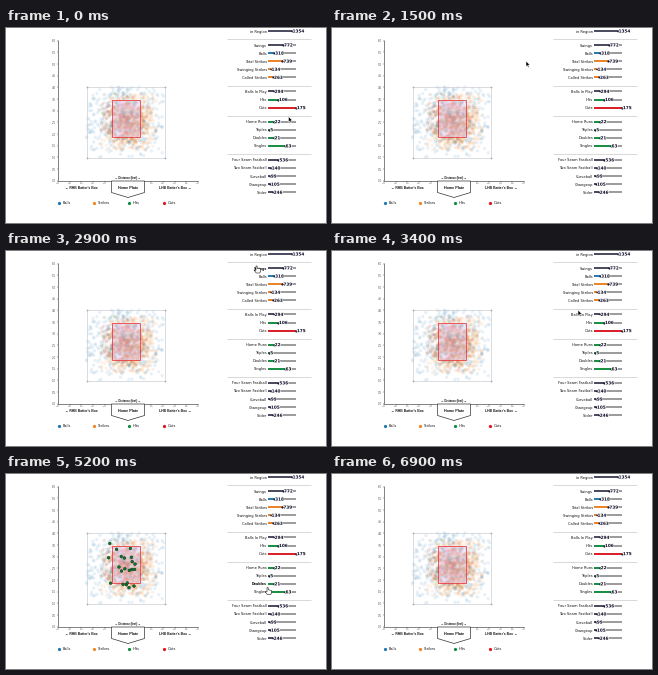
A matplotlib script for the animation above (7000 ms loop, 320 by 195 pixels).

```python
import numpy as np
import matplotlib.pyplot as plt
from matplotlib.animation import FuncAnimation
from matplotlib.colors import to_rgb
from matplotlib.patches import Polygon, Rectangle
from matplotlib.patheffects import withStroke

W, H, DPI = 320, 195, 100
FRAMES, INTERVAL = 70, 100
PT = 72 / DPI
INK, SLATE, TRACK = "#333333", "#45455c", "#929292"
BLUE, ORANGE, GREEN, RED = "#1f77b4", "#f58220", "#0b8f3a", "#e3141c"
SANS = "Liberation Sans"

fig = plt.figure(figsize=(W / DPI, H / DPI), dpi=DPI, facecolor="white")
ax = fig.add_axes([0, 0, 1, 1])
ax.set_xlim(0, W)
ax.set_ylim(H, 0)
ax.axis("off")


def line(xs, ys, color=INK, width=0.6, z=2):
    ax.plot(xs, ys, color=color, lw=width * PT, zorder=z,
            solid_capstyle="butt")


def dots(xs, ys, size, color, z=4, **kw):
    return ax.scatter(xs, ys, s=(size * PT) ** 2, c=color, linewidths=0,
                      zorder=z, **kw)


def label(x, y, s, size, ha="center", weight="normal", color="#111111",
          font="DejaVu Sans", z=6):
    return ax.text(x, y, s, fontsize=size * PT, ha=ha, va="center_baseline",
                   weight=weight, color=color, family=font, zorder=z)


# Pitch locations, in stage pixels
rng = np.random.default_rng(11)
LEFT, RIGHT, TOP, BOTTOM = 80.5, 158.5, 59, 129.5
ZONE = Rectangle((105.5, 71.5), 28.5, 37.5, fc=(0.84, 0.74, 0.95, 0.4),
                 ec="#e8383c", lw=0.8 * PT, zorder=3)
INPLAY_SPREAD = (10, 12)
STRIKE_SPREAD = (15, 15)


def cloud(n, center, spread, reach=1.9, hollow=0.0):
    """Normal scatter cut at `reach` sigmas, thinned out inside the zone."""
    pts = []
    while len(pts) < n:
        step = rng.normal(0, 1, 2)
        x, y = p = center + step * spread
        in_zone = abs(x - 120) < 14 and abs(y - 90) < 19
        if (np.abs(step).max() < reach and LEFT < x < RIGHT
                and TOP < y < BOTTOM
                and not (in_zone and rng.random() < hollow)):
            pts.append(p)
    return np.array(pts)


HITS = ["Home Runs", "Triples", "Doubles", "Singles"]
STRIKES = ["Called Strikes", "Swinging Strikes", "Fouls"]
PITCHES = ["Four Seam Fastball", "Two Seam Fastball", "Curveball",
           "Changeup", "Slider"]
PARTS = {
    "Total Strikes": STRIKES,
    "Balls In Play": HITS + ["Outs"],
    "Hits": HITS,
    "Swings": HITS + ["Outs"] + STRIKES[1:],
}

# Stat rows by section: name, count, count of a full bar, color
SECTIONS = [
    [("in Region", 1354, 1600, SLATE)],
    [("Swings", 772, 1430, SLATE), ("Balls", 318, 1430, BLUE),
     ("Total Strikes", 739, 1430, ORANGE),
     ("Swinging Strikes", 134, 1430, ORANGE),
     ("Called Strikes", 263, 1430, ORANGE)],
    [("Balls In Play", 294, 1430, SLATE), ("Hits", 106, 294, GREEN),
     ("Outs", 175, 175, RED)],
    [("Home Runs", 22, 106, GREEN), ("Triples", 5, 106, GREEN),
     ("Doubles", 21, 106, GREEN), ("Singles", 63, 106, GREEN)],
    [(name, n, 1430, SLATE)
     for name, n in zip(PITCHES, (536, 140, 99, 105, 246))],
]
counts = {row[0]: row[1] for section in SECTIONS for row in section}
counts["Fouls"] = (counts["Total Strikes"] - counts["Called Strikes"]
                   - counts["Swinging Strikes"])

points, kinds, hues = [], [], []
for kind in ["Balls", "Outs"] + STRIKES + HITS:
    n = counts[kind]
    if kind == "Balls":
        pts, hue = cloud(n, (117, 91), (25, 22), hollow=0.75), BLUE
    elif kind in STRIKES:
        pts, hue = cloud(n, (123, 94), STRIKE_SPREAD), ORANGE
    else:
        pts = cloud(n, (119, 91), INPLAY_SPREAD, reach=2.4)
        hue = RED if kind == "Outs" else GREEN
    points.append(pts)
    kinds += [kind] * n
    hues += [to_rgb(hue)] * n

order = rng.permutation(len(kinds))
points = np.vstack(points)[order]
kinds, hues = np.array(kinds)[order], np.array(hues)[order]
share = np.array([counts[p] for p in PITCHES])
pitches = rng.choice(PITCHES, len(points), p=share / share.sum())


def members(row):
    if row == "in Region":
        return np.ones(len(points), bool)
    if row in PITCHES:
        return pitches == row
    return np.isin(kinds, PARTS.get(row, [row]))


# Chart
dots(points[:, 0], points[:, 1], 3.3, hues, z=1, alpha=0.1)
line([52, 52], [12, 153])
line([52, 192], [153, 153])
for k in range(13):
    x, y = 52 + k * 11.67, 152.7 - k * 11.67
    line([50.5, 52], [y, y], width=0.4)
    line([x, x], [153, 154.5], width=0.4)
    label(49.5, y, f"{k / 2:.1f}", 2.6, ha="right", color="#555555")
    label(x, 156, f"{abs(k / 2 - 3):.1f}", 2.4, color="#555555")

ax.add_patch(Rectangle((LEFT, TOP), RIGHT - LEFT, BOTTOM - TOP, fill=False,
                       ec="#c4c6ca", lw=0.6 * PT, zorder=2))
dots([LEFT, RIGHT, LEFT, RIGHT], [TOP, TOP, BOTTOM, BOTTOM], 1.8, "#a8acb2")
ax.add_patch(ZONE)
ax.add_patch(Polygon([(105.5, 153), (105.5, 164.5), (122, 169.5),
                      (138.5, 164.5), (138.5, 153)], fc="white", ec=INK,
                     lw=0.7 * PT, zorder=7))
for x, y, size, text in [(122, 149.7, 2.7, "← Distance (feet) →"),
                         (75.3, 159.6, 3.4, "← RHB Batter's Box"),
                         (122, 159.8, 3.7, "Home Plate"),
                         (169.5, 159.6, 3.4, "LHB Batter's Box →")]:
    label(x, y, text, size, weight="bold", font=SANS, z=8)

legend = zip(("Balls", "Strikes", "Hits", "Outs"),
             (BLUE, ORANGE, GREEN, RED))
for k, (name, color) in enumerate(legend):
    x = 53.3 + 35 * k
    dots([x], [174.8], 3.2, color)
    label(x + 3, 174.9, name, 3.5, ha="left")

# Stat panel
STEP, GAP, BAR_X, BAR_W = 8.1, 5.9, 262, 28
names, row_y = {}, {}
y = 3
for section in SECTIONS:
    for name, count, full, color in section:
        end = BAR_X + BAR_W * count / full
        names[name] = label(261, y, name, 3.6, ha="right")
        row_y[name] = y
        line([BAR_X, BAR_X + BAR_W], [y, y], TRACK, 1.8)
        line([BAR_X, end], [y, y], color, 1.8, z=3)
        dots([end], [y], 2.2, "#15152f")
        num = label(end + 0.9, y, str(count), 4.2, ha="left", weight="bold",
                    color="#0c0c26")
        num.set_path_effects([withStroke(linewidth=0.9, foreground="white")])
        y += STEP
    if section is not SECTIONS[-1]:
        line([221, 305], [y, y], "#c0c0c0")
    y += GAP

# Moving parts
marks = ax.scatter([], [], s=(2.7 * PT) ** 2, linewidths=0.5 * PT, zorder=5)
ARROW = np.array([(0, 0), (0, 5.6), (1.3, 4.5), (2.2, 6.4), (3.1, 6),
                  (2.3, 4.1), (4, 4)])
HAND = np.array([(0, 0), (1.1, 0), (1.2, 2.3), (4.4, 2.9), (4.6, 5),
                 (3.8, 7), (0.3, 7), (-2, 4.1), (0, 4.4)])
pointer = Polygon(ARROW, lw=0.5 * PT, zorder=20)
ax.add_patch(pointer)

# Pointer keys: step, x, y
KEYS = [(0, 282.5, 88.5), (8, 268, 48), (12, 262, 35), (15, 194, 33),
        (24, 257, 3), (27, 256, 4), (29, 250, 15), (31, 250, 19),
        (34, 246, 59), (40, 262, 75), (52, 261, 113.5), (63, 264, 154)]
LAST = KEYS[-1][0]


def spot(i):
    steps, xs, ys = zip(*KEYS)
    return np.interp(i, steps, xs), np.interp(i, steps, ys)


def hovered(i):
    x, y = spot(i)
    row = min(row_y, key=lambda name: abs(row_y[name] - y))
    near = 225 < x < 272 and abs(row_y[row] - y) < STEP / 2
    return row if near and i <= LAST else None


def update(i):
    row = hovered(i)
    for name, text in names.items():
        text.set_weight("bold" if name == row else "normal")
        text.set_fontsize((3.4 if name == row else 3.6) * PT)

    # Dots light up one step after the pointer settles on a row
    lit = row is not None and hovered(i - 1) == row
    marks.set_visible(lit)
    if lit:
        pick = members(row)
        marks.set_offsets(points[pick])
        marks.set_facecolor(hues[pick] * (1, 0.85, 0.85))
        marks.set_edgecolor(hues[pick] * (0.6, 0.35, 0.35))

    pointer.set_xy((HAND if row else ARROW) + np.array(spot(i)))
    pointer.set_facecolor("white" if row else "black")
    pointer.set_edgecolor("black" if row else "white")
    pointer.set_visible(i <= LAST)
    return [marks, pointer, *names.values()]


anim = FuncAnimation(fig, update, frames=FRAMES, interval=INTERVAL,
                     repeat=True, repeat_delay=0, blit=False)
plt.show()
```
